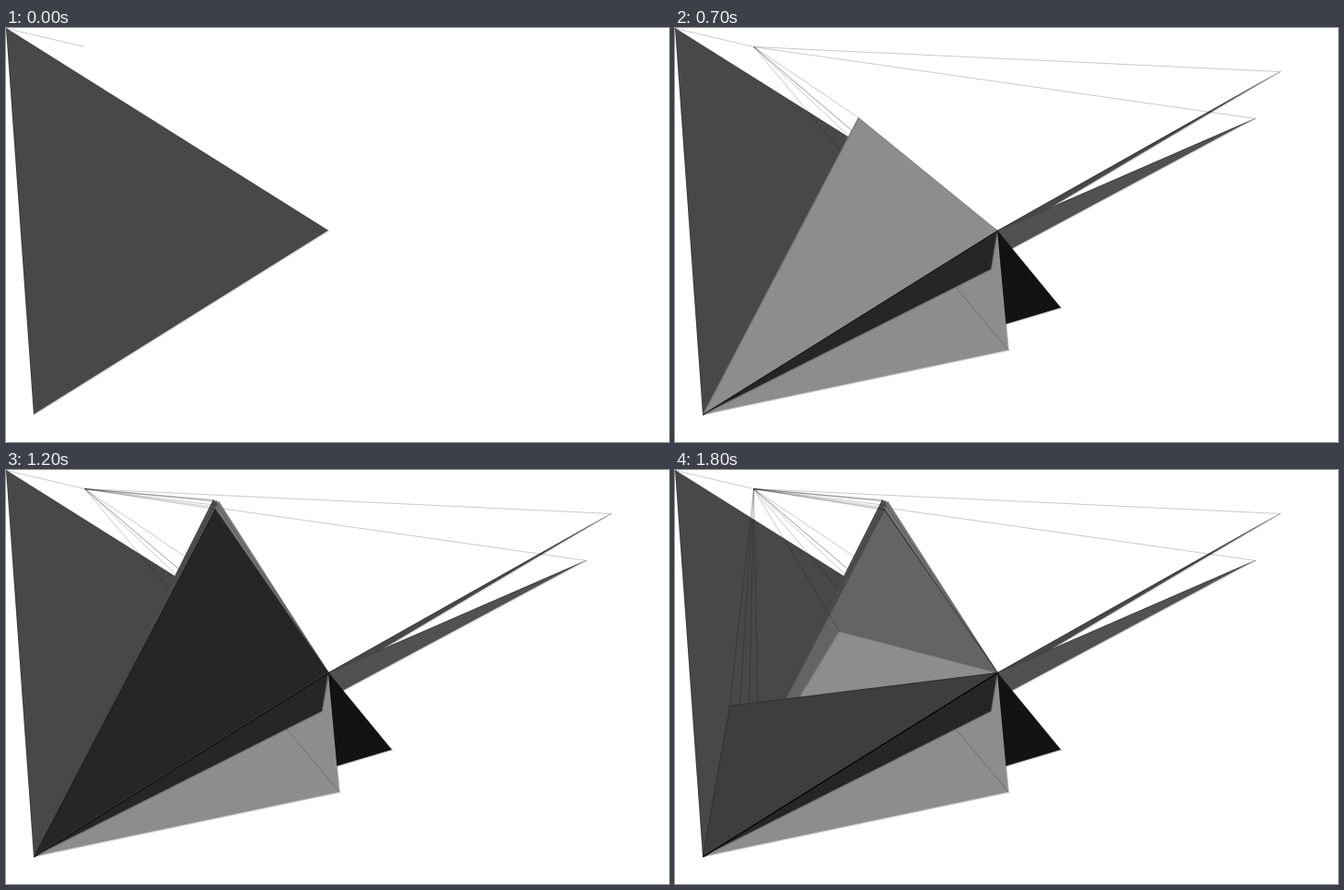
An HTML page with a canvas that plays this animation: 720 by 450 pixels, repeating every 1.9 s.

```html
<!DOCTYPE html>
<html lang="en">
<head>
<meta charset="utf-8">
<title>Triangles</title>
<style>
  html, body { margin: 0; width: 100%; height: 100%; overflow: hidden; background: #fff; }
  canvas { display: block; }
</style>
</head>
<body>
<canvas id="stage" width="720" height="450"></canvas>
<script>
const ctx = document.getElementById('stage').getContext('2d');
const STEP = 100;
const LEFT = [30, 420], RIGHT = [350, 220], ANCHOR = [85, 20];

const BLACK = '#060606', INK = '#131313', COAL = '#262626', IRON = '#3e3e3e', SLATE = '#484848',
  STONE = '#515151', ASH = '#646464', GREY = '#747474', SILVER = '#8d8d8d';

// Builds the sequence of apexes, one triangle per step
const triangles = [];

function moveTo(x, y, tone) {
  triangles.push({ x, y, tone });
}

// Travels to a new apex with evenly spaced stops in the tone of the last one
function glideTo(x, y, tone, stops) {
  const from = triangles.at(-1);
  for (let i = 1; i <= stops; i++) {
    const t = i / (stops + 1);
    moveTo(from.x + (x - from.x) * t, from.y + (y - from.y) * t, from.tone);
  }
  moveTo(x, y, tone);
}

moveTo(0, 0, SLATE);

// Long spikes and wedges to the right and below
moveTo(657, 47, SLATE);
moveTo(630, 98, STONE);
moveTo(419, 304, INK);
moveTo(362, 350, SILVER);
moveTo(343, 262, COAL);

// Tall peaks
glideTo(199, 97, SILVER, 1);
moveTo(225, 32, STONE);
glideTo(231, 34, GREY, 1);
glideTo(227, 42, COAL, 1);
moveTo(227, 43, ASH);

// Low slopes on the left
moveTo(178, 175, SILVER);
moveTo(90, 283, BLACK);
glideTo(59, 256, IRON, 2);

function trace(points) {
  ctx.beginPath();
  for (const [x, y] of points) ctx.lineTo(x, y);
}

function drawTriangle({ x, y, tone }) {
  const corners = [LEFT, RIGHT, [x, y]];
  trace(corners);
  ctx.fillStyle = tone;
  ctx.fill();

  // Outlines sit on pixel centres, half a pixel off the fills
  ctx.save();
  ctx.translate(0.5, 0.5);
  trace(corners);
  ctx.closePath();
  ctx.stroke();
  trace([ANCHOR, [x, y]]);
  ctx.stroke();
  ctx.restore();
}

function drawScene(count) {
  ctx.fillStyle = '#fff';
  ctx.fillRect(0, 0, 720, 450);
  ctx.strokeStyle = 'rgba(0, 0, 0, 0.21)';
  ctx.lineJoin = 'round';
  triangles.slice(0, count).forEach(drawTriangle);
}

let start = null;
let shown = 0;

function tick() {
  const now = performance.now();
  start ??= now;
  const count = Math.floor((now - start) / STEP) % triangles.length + 1;
  if (count !== shown) drawScene(shown = count);
  requestAnimationFrame(tick);
}

tick();
</script>
</body>
</html>
```
